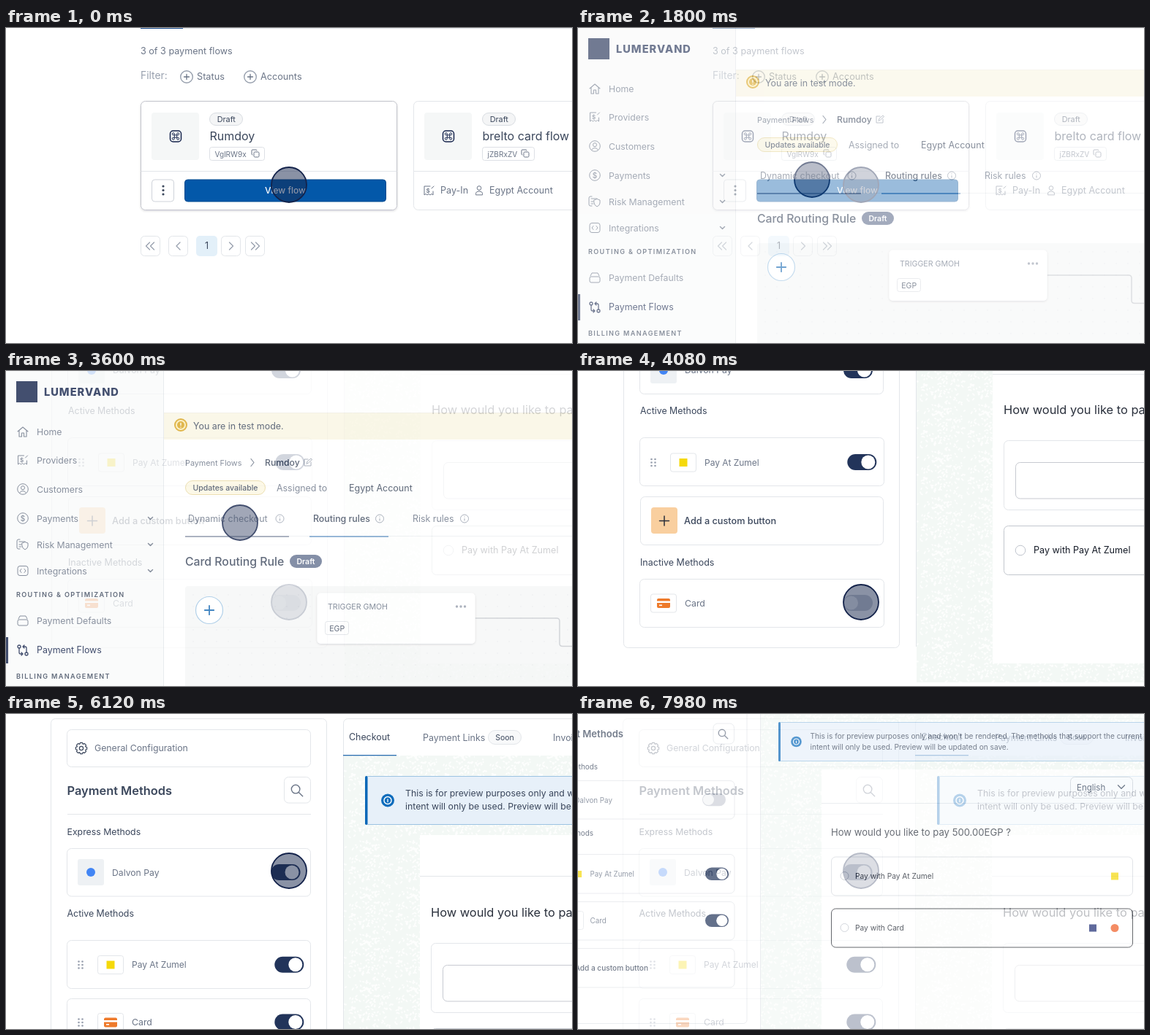
Recreate the animation shown at these times as an HTML page. Size 774 by 432 pixels, loop 8 s.

```html
<!DOCTYPE html>
<html lang="en">
<head>
<meta charset="utf-8">
<title>Payment flow walkthrough</title>
<style>
html, body { margin: 0; width: 100%; height: 100%; overflow: hidden; background: #fff; }
svg { position: absolute; left: 0; top: 0; width: 774px; height: 432px; display: block; }
text { font-family: Inter, "Open Sans", sans-serif; white-space: pre; }
.scene { animation: 8s step-end infinite; }
#flow { animation-name: flow; }
#methods { animation-name: methods; }
#checkout { animation-name: checkout; }
#result { animation-name: result; }
/* each dissolve climbs by a tenth every 60 ms */
@keyframes flow {
  0% { opacity: 0 }
  18.75% { opacity: .1; animation-timing-function: steps(9) }
  25.5%, 100% { opacity: 1 }
}
@keyframes methods {
  0% { opacity: 0 }
  44.25% { opacity: .1; animation-timing-function: steps(9) }
  51%, 100% { opacity: 1 }
}
@keyframes checkout {
  0% { opacity: 0 }
  69.75% { opacity: .1; animation-timing-function: steps(9) }
  76.5%, 100% { opacity: 1 }
}
@keyframes result {
  0% { opacity: 0 }
  95.25% { opacity: .1; animation-timing-function: steps(6) }
  99.75%, 100% { opacity: .7 }
}
</style>
</head>
<body>
<svg id="stage" viewBox="0 0 774 432"></svg>
<script>
const NAVY = '#14234b', INK = '#3b475c', GREY = '#6b7587', SOFT = '#98a0ae', EDGE = '#e3e6ea', BLUE = '#0358a9';
const BRAND = 'LUMERVAND', FLOW = 'Rumdoy', WALLET = 'Dalvon Pay', SHOP = 'Pay At Zumel';
const QUESTION = 'How would you like to pay 500.00EGP ?';

const text = (x, y, s, size = 12.3, fill = GREY, weight = 400, more = '') =>
  `<text x="${x}" y="${y}" font-size="${size}" fill="${fill}" font-weight="${weight}" ${more}>${s}</text>`;
const rect = (x, y, w, h, r = 0, fill = 'none', stroke = 'none', more = '') =>
  `<rect x="${x}" y="${y}" width="${w}" height="${h}" rx="${r}" fill="${fill}" stroke="${stroke}" ${more}/>`;
const dot = (x, y, r, fill = 'none', stroke = 'none', sw = 1) =>
  `<circle cx="${x}" cy="${y}" r="${r}" fill="${fill}" stroke="${stroke}" stroke-width="${sw}"/>`;
const line = (d, stroke = EDGE, sw = 1) =>
  `<path d="${d}" fill="none" stroke="${stroke}" stroke-width="${sw}" stroke-linecap="round" stroke-linejoin="round"/>`;
const END = 'text-anchor="end"', MID = 'text-anchor="middle"';

const cursor = (x, y) => `<circle cx="${x}" cy="${y}" r="24" fill="#17264d" fill-opacity=".5" stroke="${NAVY}" stroke-width="1.8"/>`;
const plus = (x, y, r, c, sw) => line(`M${x - r} ${y}h${2 * r}M${x} ${y - r}v${2 * r}`, c, sw);
const chevron = (x, y, dx, dy, c = GREY, sw = 1.3) => dx
  ? line(`M${x - dx / 2} ${y - 5}l${dx} 5l${-dx} 5`, c, sw)
  : line(`M${x - dy} ${y - dy / 2}l${dy} ${dy}l${dy} ${-dy}`, c, sw);
const info = (x, y) => dot(x, y, 5.5, 'none', SOFT) + line(`M${x} ${y}v2.5M${x} ${y - 2.6}v.2`, SOFT, 1.1);
const copy = (x, y) => rect(x + 3, y + 3, 7, 7, 1.5, 'none', GREY) + line(`M${x + 1} ${y + 7}q-1 0 -1 -1v-5q0 -1 1 -1h5q1 0 1 1`, GREY);
const search = (x, y, s) => dot(x - s * .12, y - s * .12, s * .36, 'none', GREY, 1.4) + line(`M${x + s * .15} ${y + s * .15}l${s * .33} ${s * .33}`, GREY, 1.4);
const person = (x, y, c = GREY) => dot(x, y - 3, 2.8, 'none', c) + line(`M${x - 4.5} ${y + 6}v-1q0 -3.5 4.5 -3.5t4.5 3.5v1z`, c);
const customer = (x, y) => dot(x, y, 7.3, 'none', GREY) + dot(x, y - 1.8, 2.5, 'none', GREY) + line(`M${x - 4.5} ${y + 5.5}q1 -3 4.5 -3t4.5 3`, GREY);
const receipt = (x, y, c = GREY) => line(`M${x + 2} ${y - 6}h-8v12l2 -1.5l2 1.5l2 -1.5l2 1.5l2 -1.5l2 1.5v-5M${x + 4} ${y - 3}l3 -3`, c)
  + text(x - 1, y + 3, '$', 8, c, 600, MID);
const grip = (x, y) => [0, 1, 2, 3, 4, 5].map(i => dot(x + i % 2 * 5, y - 4.5 + (i >> 1) * 4.5, 1.3, SOFT)).join('');
const toggle = (x, cy, on = true, s = 1) => rect(x, cy - 11 * s, 40 * s, 22 * s, 11 * s, on ? '#22345a' : '#cdd1d9')
  + dot(x + (on ? 28.5 : 10.5) * s, cy, 9.5 * s, on ? '#fff' : '#f4f5f7');
const cardIcon = (x, y) => rect(x, y, 18, 13, 2, '#ee7a2b') + rect(x, y + 3.5, 18, 2.5, 0, '#fff') + rect(x + 3, y + 8.5, 4, 1.6, 0, '#fff');
const iconBox = (x, y) => rect(x + .5, y + .5, 35, 25, 3, '#fff', EDGE);
const shopBox = (x, y) => iconBox(x, y) + rect(x + 12.5, y + 7.5, 11, 11, 0, '#f5d90a');
const walletTile = (x, y) => rect(x, y, 36, 36, 3, '#eef1f4') + dot(x + 18, y + 18, 6, '#4285f4');
const row = (x, y, w, h, c = EDGE) => rect(x + .5, y + .5, w, h, 6, '#fff', c);
const command = (x, y) => rect(x - 7.5, y - 7.5, 15, 15, 4, 'none', NAVY, 'stroke-width="1.5"')
  + rect(x - 1.7, y - 1.7, 3.4, 3.4, 0, 'none', NAVY)
  + [[-1, -1], [1, -1], [-1, 1], [1, 1]].map(([a, b]) => dot(x + a * 3.2, y + b * 3.2, 1.5, 'none', NAVY)).join('');
const gear = (x, y) => line([0, 1, 2, 3, 4, 5, 6, 7].map(i => {
  const p = (r, a) => (x + r * Math.cos(a)).toFixed(1) + ' ' + (y + r * Math.sin(a)).toFixed(1), a = i * Math.PI / 4;
  return (i ? 'L' : 'M') + p(6, a - .4) + 'L' + p(7.8, a - .2) + 'L' + p(7.8, a + .2) + 'L' + p(6, a + .4);
}).join('') + 'z', INK, 1.2) + dot(x, y, 2.6, 'none', INK, 1.2);

// speckled backdrop and dotted canvas
let seed = 7;
const rnd = () => (seed = seed * 16807 % 2147483647) / 2147483647;
const specks = Array.from({ length: 150 }, () =>
  `M${(rnd() * 64).toFixed(1)} ${(rnd() * 64).toFixed(1)}l${(rnd() * 4 - 2).toFixed(1)} ${(rnd() * 4 - 2).toFixed(1)}`).join('');
const defs = `<defs>
  <pattern id="speckle" width="64" height="64" patternUnits="userSpaceOnUse">${rect(0, 0, 64, 64, 0, '#f3f8f5') + line(specks, '#fdfefd', 2)}</pattern>
  <pattern id="grid" x="248" y="299" width="16" height="16" patternUnits="userSpaceOnUse">${dot(8, 8, .7, '#e3e6e8')}</pattern>
  <filter id="shade" x="-10%" y="-10%" width="120%" height="130%"><feDropShadow dx="0" dy="1" stdDeviation="1.5" flood-color="#101828" flood-opacity=".16"/></filter>
</defs>`;

const page = rect(0, 0, 774, 432, 0, '#fff');

function flowCard(x, name, id, idWidth, edge, more = '') {
  return rect(x + .5, 100.5, 350, 149, 6, '#fff', edge, more) + line(`M${x + 1} 196.5h349`)
    + rect(x + 15, 116, 65, 65, 4, '#f5f7f7') + command(x + 48, 148.5)
    + rect(x + 94.5, 116.5, 45, 17, 8.5, '#f4f5f6', '#d9dde2') + text(x + 117.3, 129, 'Draft', 10.8, INK, 400, MID)
    + text(x + 94.5, 153.5, name, 16, INK)
    + rect(x + 94.5, 163.5, idWidth, 18, 3, '#fff', '#dde0e5') + text(x + 101.5, 176.5, id, 10.1)
    + copy(x + idWidth + 77, 167);
}

function listScene() {
  const filter = (x, s) => dot(x, 67, 8.3, 'none', SOFT, 1.4) + plus(x, 67, 3.5, GREY, 1.3) + text(x + 14, 71, s, 12.7);
  const pager = x => rect(x + .5, 285.5, 26, 27, 5, '#fff', EDGE);
  return page + rect(242, 0, 532, 1, 0, EDGE) + rect(184, 0, 58, 1, 0, '#1d4f91')
    + text(184, 36, '3 of 3 payment flows', 12.6) + text(184, 70, 'Filter:', 13.8, SOFT)
    + filter(247, 'Status') + filter(334, 'Accounts')
    + flowCard(184, FLOW, 'VglRW9x', 75, '#c4c5cd', 'filter="url(#shade)"')
    + rect(199.5, 208, 30, 30, 4, '#fff', '#cfd3da') + [217, 222.5, 228].map(y => dot(215, y, 1.6, INK)).join('')
    + rect(244.5, 208, 275, 30, 4, BLUE, '#034a8f') + text(382, 227, 'View flow', 12, '#fff', 500, MID)
    + flowCard(557, 'brelto card flow', 'jZBRxZV', 71, EDGE)
    + receipt(578, 223) + text(594, 227, 'Pay-In', 12.6) + person(647, 222.5) + text(661, 227, 'Egypt Account', 12.5)
    + [184, 222, 294, 327].map(pager).join('') + rect(260, 285, 29, 28, 5, '#e3f0f9') + text(274.5, 303, '1', 12.5, INK, 400, MID)
    + [194, 200, 235.5].map(x => chevron(x, 299, -5, 0, SOFT)).join('')
    + [308, 338, 344].map(x => chevron(x, 299, 5, 0, SOFT)).join('')
    + cursor(387, 215);
}

function flowScene() {
  const nav = [['Home', 83], ['Providers', 122], ['Customers', 162], ['Payments', 202], ['Risk Management', 238],
    ['Integrations', 274], ['Payment Defaults', 342]].map(([s, y]) => text(42, y + 4.7, s)).join('');
  const heading = (y, s) => text(14, y, s, 9.1, INK, 600, 'letter-spacing="1.35"');
  const icons = line('M16 83l7 -6l7 6M18 82v8h3.5v-5h3v5h3.5v-8', GREY, 1.1) + receipt(22.5, 122) + customer(23, 162)
    + dot(23, 202, 7.3, 'none', GREY) + text(23, 205.7, '$', 10, GREY, 500, MID)
    + line('M19 231h-2q-2 0 -2 2v9q0 2 2 2h2M18 234h8M18 238h3M18 241h3M22 236l4 -1.5l4 1.5v4q0 3 -4 5q-4 -2 -4 -5z', GREY)
    + rect(16, 267.5, 14, 13, 3, 'none', GREY) + line('M21 271.5l-2 2.5l2 2.5M25 271.5l2 2.5l-2 2.5', GREY)
    + rect(16, 341, 14, 8, 2, 'none', GREY) + line('M17 340l2 -4h8l2 4', GREY)
    + dot(18, 378, 2, 'none', NAVY, 1.3) + dot(28, 388, 2, 'none', NAVY, 1.3)
    + line('M18 380v6q0 2 2 2h3m-2 -2l2 2l-2 2M28 386v-6q0 -2 -2 -2h-3m2 -2l-2 2l2 2', NAVY, 1.3);
  const tab = (x, y, s, ix, c, w) => text(x, y, s, 12.4, c, w) + info(ix, 202.5);
  return page + rect(0, 0, 215, 432, 0, '#f9fafa') + rect(215, 0, 1, 432, 0, EDGE)
    + rect(14, 14, 29, 29, 0, NAVY) + text(52, 33.5, BRAND, 14.6, NAVY, 800, 'letter-spacing="1"')
    + nav + icons + rect(0, 365, 3, 36, 0, NAVY) + text(42, 387, 'Payment Flows', 12.4, NAVY)
    + heading(310, 'ROUTING &amp; OPTIMIZATION') + heading(422, 'BILLING MANAGEMENT')
    + [202, 238, 274].map(y => chevron(197.5, y, 0, 3, GREY, 1.5)).join('')
    + rect(216, 57, 558, 37, 0, '#f9f5e3') + rect(216, 57, 558, 1, 0, '#f0ede2')
    + dot(239, 74, 8, '#fbedb8', '#d9a520', 2) + dot(239, 74, 5, '#d9a520') + line('M239 71.5v3M239 77v.2', '#fff', 1.3)
    + text(256, 80, 'You are in test mode.', 12.4, INK)
    + text(245, 129.5, 'Payment Flows', 10.8) + chevron(337, 125.5, 4, 0, GREY, 1.2) + text(354, 129.7, FLOW, 12.2, INK, 500)
    + line('M413 121h-5v9h9v-5M411 127l1 -3l5 -4l1.5 1.5l-5 4.5z', SOFT)
    + rect(245.5, 150.5, 109, 19, 9.5, '#fcf7e2', '#e8d89f') + text(300, 164, 'Updates available', 10.5, INK, 500, MID)
    + text(370, 164.5, 'Assigned to', 12.4) + text(469, 164.5, 'Egypt Account', 12.5, INK)
    + tab(249, 206.7, 'Dynamic checkout', 374.5, GREY, 400) + tab(420, 206.7, 'Routing rules', 511, INK, 500) + tab(556, 206.7, 'Risk rules', 627, GREY, 400)
    + rect(245, 226, 529, 1, 0, '#eceef1') + rect(245, 226, 142, 2, 0, '#979fb1') + rect(415, 226, 108, 2, 0, '#7ea5cd')
    + text(245, 266.5, 'Card Routing Rule', 15.8, INK, 500) + rect(388, 252, 44, 18, 9, '#667391') + text(410, 265, 'Draft', 10.5, '#fff', 600, MID)
    + rect(245, 295, 540, 150, 4, '#f6f7f7') + rect(245, 295, 529, 137, 0, 'url(#grid)')
    + dot(278, 328, 18.5, '#fff', '#9fc5e4', 1.2) + plus(278, 328, 6.2, '#1568b3', 1.8)
    + line('M642 339h111q4 0 4 4v30.5q0 4 4 4h14', '#c6cacf', 1.5)
    + rect(425.5, 304.5, 216, 69.5, 5, '#fff', 'none', 'filter="url(#shade)"')
    + text(440, 327, 'TRIGGER GMOH', 10.6) + [616.5, 622, 627.5].map(x => dot(x, 323, 1.7, SOFT)).join('')
    + rect(436.5, 343.5, 32, 18, 3, '#fff', '#dde0e5') + text(452.7, 357, 'EGP', 10.5, INK, 400, MID)
    + cursor(320, 208);
}

function methodsScene() {
  return page + rect(463, 0, 311, 427, 0, 'url(#speckle)') + rect(462, 0, 1, 378, 0, EDGE)
    + rect(567, 0, 207, 401, 0, '#fff') + rect(567, 4, 207, 1, 0, EDGE)
    + rect(62.5, -20.5, 377, 400, 6, '#fff', EDGE)
    + row(84, -35, 333, 66) + walletTile(99, -19) + text(146, 3.3, WALLET, 12.2) + toggle(363, -1)
    + text(85, 59.3, 'Active Methods', 12.4, INK)
    + row(84, 91, 334, 66) + grip(100.5, 125.5) + shopBox(126, 112.5) + text(173, 129.5, SHOP, 12) + toggle(368.3, 125)
    + row(85, 172, 332, 66) + rect(100, 187, 36, 36, 4, '#f9cf9f') + plus(118, 205.5, 6.5, '#2a2f3a', 1.5)
    + text(145, 210, 'Add a custom button', 12.7, INK, 500)
    + text(85, 267, 'Inactive Methods', 12.5, INK)
    + row(84, 285, 334, 66) + iconBox(99, 305.5) + cardIcon(108, 312) + text(146, 323, 'Card') + toggle(363, 318, false)
    + text(582, 59, QUESTION, 16.4, '#2a303c')
    + row(582, 95, 300, 95) + row(598, 125, 260, 49.5, '#c7cad1')
    + row(582, 212, 300, 67, '#c3c7ce') + dot(605, 246, 6.8, '#fff', '#bfc4cd') + text(623, 249.7, 'Pay with ' + SHOP, 12.6, '#151b27')
    + cursor(387, 317);
}

function checkoutScene() {
  return page + row(61, 6, 377, 500) + row(83, 21, 333, 51) + gear(103, 47) + text(121, 51.3, 'General Configuration')
    + text(83.5, 110.5, 'Payment Methods', 16.4, INK, 600) + row(380, 86, 36, 35.5) + search(398, 105, 16)
    + rect(84, 137, 333, 1, 0, EDGE) + text(83.5, 165.5, 'Express Methods', 12.3, INK)
    + row(83, 184, 333, 65.5) + walletTile(98, 199) + text(145, 221.5, WALLET, 12.2) + toggle(362.5, 217)
    + text(83.5, 278, 'Active Methods', 12.4, INK)
    + row(83, 310, 333, 66) + grip(99.5, 344) + shopBox(125, 331) + text(172, 348, SHOP, 12) + toggle(367.3, 343.7)
    + row(83, 390, 333, 66) + grip(99.5, 423) + iconBox(125, 410) + cardIcon(134, 416.5) + text(172, 427, 'Card') + toggle(367.3, 422.5)
    + row(461, 6, 400, 500) + rect(462, 57, 312, 375, 0, 'url(#speckle)')
    + text(469, 35.5, 'Checkout', 12.4, INK) + rect(461, 56, 73, 1.3, 0, '#2a6db0')
    + text(570, 36.5, 'Payment Links', 12.4) + rect(659.5, 22.5, 45, 19, 9.5, '#f8f9fa', EDGE)
    + text(682, 35.5, 'Soon', 10.5, INK, 400, MID) + text(748, 36.5, 'Invoices', 12.4)
    + rect(491.5, 85.5, 300, 66, 3, '#e7f0f9', '#9cc3e2') + rect(491, 85, 3.5, 67, 1.7, '#0b68b8')
    + dot(522, 118.5, 9, '#0d6cbc') + dot(522, 118.5, 5, 'none', '#fff', 1.4) + line('M522 117v3.5', '#fff', 1.3)
    + text(546, 113, "This is for preview purposes only and won't be", 12.3, INK) + text(546, 131, 'intent will only be used. Preview will be updated', 12.3, INK)
    + rect(566, 166, 208, 266, 0, '#fff') + rect(566, 222, 208, 1, 0, EDGE)
    + text(581, 278, QUESTION, 16.4, '#2a303c')
    + row(581, 314, 300, 95) + row(597, 344, 260, 49.5, '#c7cad1') + row(581, 431, 300, 66, '#c3c7ce')
    + cursor(387, 215);
}

function resultScene() {
  const option = (y, s, edge) => row(346, y, 412, 53, edge) + dot(364.5, y + 26.5, 5.5, '#fff', '#bfc4cd') + text(379, y + 30, s, 10.2, '#151b27');
  const item = (y, h) => row(-60, y, 273.5, h);
  return page + rect(250, 0, 524, 432, 0, 'url(#speckle)') + rect(249, 0, 1, 432, 0, EDGE)
    + rect(-60.5, -20.5, 291.5, 445, 5, '#fff', EDGE)
    + text(62, 32, 'Payment Methods', 13.1, INK, 600, END) + row(184.5, 12.5, 28.5, 28) + search(198.5, 27.5, 13)
    + text(27, 76, 'Express Methods', 9.9, INK, 400, END)
    + item(91, 52.5) + text(47, 121.5, WALLET, 9.8, GREY, 400, END) + toggle(170, 117.5, false, .8)
    + text(21, 166.5, 'Active Methods', 9.9, INK, 400, END)
    + item(192, 53.5) + rect(-4, 215, 9, 9, 0, '#f5d90a') + text(16.5, 223, SHOP, 9.7) + toggle(174, 219.3, true, .8)
    + item(257, 52.5) + iconBox(-28, 270) + text(16.5, 287, 'Card', 9.9) + toggle(174, 283.3, true, .8)
    + item(321, 53.5) + text(96, 351.5, 'Add a custom button', 10.1, INK, 500, END)
    + rect(274.5, 11.5, 520, 53, 3, '#e7f0f9', '#9cc3e2') + rect(274, 11, 3, 54, 1.5, '#0b68b8')
    + dot(298.5, 38, 7.3, '#0d6cbc') + dot(298.5, 38, 4, 'none', '#fff', 1.2) + line('M298.5 37v2.5', '#fff', 1.1)
    + text(317.5, 34, "This is for preview purposes only and won't be rendered. The methods that support the current payment", 10.1, INK)
    + text(317.5, 48.5, 'intent will only be used. Preview will be updated on save.', 10.1, INK)
    + rect(333, 76, 441, 356, 0, '#fff') + rect(333, 122, 441, 1, 0, EDGE)
    + row(673, 86, 85, 29, '#d0d4da') + text(682, 105, 'English', 11.5, INK) + chevron(743, 100, 0, 4.5, INK, 1.3)
    + text(346, 166.5, QUESTION, 13.1, '#2a303c')
    + option(195.5, 'Pay with ' + SHOP, '#d5d8de') + rect(729, 217.5, 10, 10, 0, '#f5d90a')
    + option(266.5, 'Pay with Card', '#23272f') + rect(699, 288.5, 10, 10, 0, '#1a2a72') + dot(734, 293.5, 5.5, '#ef5b22');
}

const scene = (id, body) => `<g id="${id}" class="scene">${body}</g>`;
document.getElementById('stage').innerHTML = defs + listScene() + scene('flow', flowScene())
  + scene('methods', methodsScene()) + scene('checkout', checkoutScene()) + scene('result', resultScene());
</script>
</body>
</html>
```
